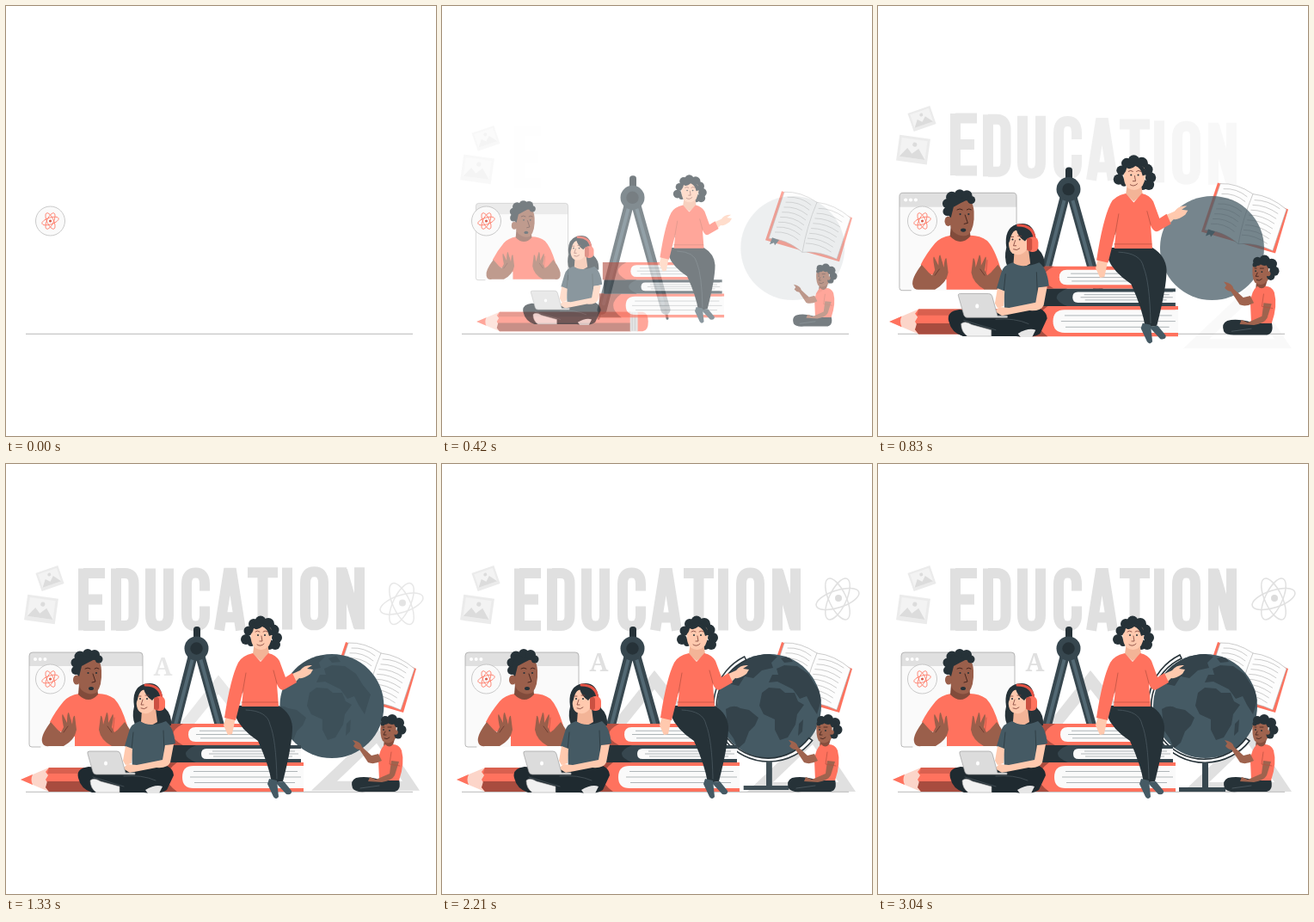
An HTML page for the animation above (3080 ms loop, 500x500 px).

```html
<!DOCTYPE html>
<html lang="en">
<head>
<meta charset="utf-8">
<title>Education</title>
<style>
html, body { margin: 0; height: 100%; overflow: hidden; background: #fff; }
svg { display: block; width: 100%; height: 100%; }
.line { fill: none; stroke-linecap: round; stroke-linejoin: round; }
</style>
</head>
<body>
<svg viewBox="0 0 500 500">
  <defs>
    <clipPath id="sphere"><circle cx="380.5" cy="281.5" r="60.5"/></clipPath>
    <g id="orbits">
      <ellipse rx="26" ry="10" transform="rotate(-18)"/>
      <ellipse rx="26" ry="10" transform="rotate(65)"/>
      <ellipse rx="26" ry="10" transform="rotate(115)"/>
    </g>
    <g id="photo">
      <rect x="-18" y="-15" width="36" height="30" fill="#ebebeb"/>
      <rect x="-15" y="-12" width="30" height="22" fill="#f3f3f3"/>
      <path d="M-15 10L-7 -1L-1 5L6 -2L15 10Z" fill="#dcdcdc"/>
      <circle cx="1" cy="-6" r="2.6" fill="#dcdcdc"/>
    </g>
    <path id="arm" d="M52 300Q40 316 42 323Q43 329 50 328H67Q80 321 82 309L80 293Q78 291 77 303L73 289Q71 288 71 301L66 291Q64 291 67 306L64 312L60 309Z"/>
  </defs>

  <g id="photos">
    <use href="#photo" transform="translate(51 133) rotate(-19) scale(.76 .74)"/>
    <use href="#photo" transform="translate(41 169) rotate(8)"/>
  </g>
  <g id="word" role="img" aria-label="EDUCATION" fill="none" stroke="#e0e0e0" stroke-width="12"></g>
  <g id="atom" fill="none" stroke="#e0e0e0" stroke-width="1.500">
    <use href="#orbits" x="460" y="157"/>
    <circle cx="461" cy="156" r="4" fill="#dcdcdc" stroke="none"/>
  </g>
  <g id="serif"><text x="182.500" y="240.500" text-anchor="middle" font-family="Noto Serif, Liberation Serif, serif" font-weight="700" font-size="29" fill="#e0e0e0">A</text></g>
  <path id="roof" d="M247 240L190 312H305ZM247 262L280 304H213Z" fill="#e0e0e0" fill-rule="evenodd"/>
  <path id="square" d="M432 308L355 381H481ZM431 326L461 370H385Z" fill="#e0e0e0" fill-rule="evenodd"/>

  <g id="openBook">
    <path d="M395 207L398 208L477 238L462 289L376 264Z" fill="#ff725e"/>
    <path d="M398 208Q417 207 436 220Q456 222 475 238L459 286Q438 276 419 278Q400 262 380 262Z" fill="#fdfdfd" stroke="#aaa" stroke-width=".6"/>
    <path d="M436 220Q424 248 419 278" class="line" stroke="#c4c4c4" stroke-width=".9"/>
    <g id="bookLines" class="line" stroke="#aaa" stroke-width=".6"></g>
    <path d="M384 261L392 264L387 270L386 267L381 269Z" fill="#455a64"/>
  </g>

  <g id="call">
    <path d="M27 329V223Q27 219 31 219H155Q159 219 159 223V329Z" fill="#fafafa"/>
    <path d="M27 235V223Q27 219 31 219H155Q159 219 159 223V235Z" fill="#e0e0e0"/>
    <path d="M40 329H30Q27 329 27 326V223Q27 219 31 219H155Q159 219 159 223V329" class="line" stroke="#a9a9a9" stroke-width=".8"/>
    <g fill="#fff"><circle cx="34" cy="227" r="2"/><circle cx="39.700" cy="227" r="2"/><circle cx="45.400" cy="227" r="2"/></g>
    <path d="M85 267Q73 269 67 276Q57 288 51 300L60 310L80 317V328H123L126 315L141 304Q134 281 126 273Q118 267 107 267Z" fill="#ff725e"/>
    <path d="M75 297L78 318M126 295L124 315" class="line" stroke="#b5503f" stroke-width=".7"/>
    <path d="M85 256L84 268Q96 280 107 268L106 258Z" fill="#814b3b"/>
    <path d="M84 236Q82 257 88 263Q97 270 105 266Q112 258 111 240Q110 223 96 223Q86 226 84 236Z" fill="#9a5f4b"/>
    <ellipse cx="82" cy="251" rx="4" ry="5.500" fill="#9a5f4b"/>
    <g fill="#263238">
      <circle cx="81" cy="240" r="5"/><circle cx="81" cy="231" r="5.500"/><circle cx="86" cy="224" r="6.500"/>
      <circle cx="95" cy="221" r="6"/><circle cx="103" cy="222" r="6"/><circle cx="108" cy="227" r="4.500"/>
      <path d="M79 241L85 247L88 235Q97 230 103 227L86 222Z"/>
      <circle cx="95.500" cy="243" r="1.100"/><circle cx="105" cy="243" r="1.100"/>
      <ellipse cx="99" cy="261" rx="3" ry="2"/>
    </g>
    <path d="M92 238Q95 236 98 238M103 238Q105 236 108 238M101 244L104 253L100 254" class="line" stroke="#3d211c" stroke-width=".9"/>
    <use href="#arm" fill="#9a5f4b"/>
    <use href="#arm" fill="#9a5f4b" transform="matrix(-1 0 0 1 190 0)"/>
    <path d="M67 312L72 305M123 312L118 305" class="line" stroke="#5b332b" stroke-width=".7"/>
  </g>

  <circle cx="51.500" cy="250" r="17" fill="#fafafa" stroke="#bdbdbd" stroke-width=".8"/>
  <g transform="translate(51.500 250) scale(.39)" fill="none" stroke="#ff725e" stroke-width="1.900">
    <use href="#orbits"/><circle r="4" fill="#d85f4f" stroke="none"/>
  </g>
  <path d="M23 381.300H473" stroke="#b0b0b0" stroke-width=".9"/>

  <g id="compass">
    <g class="line" stroke="#37474f" stroke-width="11"><path d="M217 224L186 345M226 224L260 345"/></g>
    <path d="M217 226L188 338M226 226L257 338" class="line" stroke="#526873" stroke-width="4"/>
    <path d="M184 345L182 355M260 345L262 355" class="line" stroke="#263238" stroke-width="3"/>
    <rect x="218" y="189" width="8" height="18" rx="3.500" fill="#263238"/>
    <circle cx="221.500" cy="214.500" r="14" fill="#37474f"/>
    <circle cx="221.500" cy="214.500" r="7.200" fill="#263238"/>
  </g>

  <g id="pencil">
    <path d="M17 367L50 353V381Z" fill="#fcd5c9"/>
    <path d="M17 367L31 361Q28 367 31 373Z" fill="#ff725e"/>
    <path d="M50 353H238V381H50L46 376L49 372L46 367L49 362L46 358Z" fill="#ff725e"/>
    <path d="M50 353H238V360H48Z" fill="#d9604f"/>
    <path d="M48 369H238V381H50L46 376Z" fill="#a84c3f"/>
    <path d="M247 353H255Q263 354 263 367T255 381H247Z" fill="#ff725e"/>
    <path d="M237 353H248V381H237Z" fill="#d5d5d5"/>
    <path d="M240 354V380M244 354V380" stroke="#999" stroke-width=".7"/>
  </g>

  <g id="globe">
    <circle cx="380.500" cy="281.500" r="60.500" fill="#455a64"/>
    <g clip-path="url(#sphere)"><g id="lands" fill="#34434b">
      <path d="M332 244Q345 222 378 220L390 224L383 231L385 237L372 240L362 249L352 247L345 258L336 256Z"/>
      <path d="M330 285Q339 279 347 284L357 286L368 295L364 304L357 311L352 324L344 331L339 319L332 309Z"/>
      <path d="M372 266L380 260L393 261L399 266L410 266L414 276L421 280L413 291L411 303L402 318L393 321L387 309L387 297L374 291L369 281Z"/>
      <path d="M380 254L384 245L391 245L389 238L398 234L413 235L426 244L434 257L443 268L436 291L429 280L424 270L416 273L408 262L398 257L390 253Z"/>
      <path d="M415 302L420 297L419 311L414 316ZM394 226L403 223L408 230L398 231Z"/>
    </g></g>
  </g>
  <g id="stand">
    <path d="M351 222A66 66 0 1 0 432 322L428 319A61.500 61.500 0 1 1 353 226Z" fill="#fff" stroke="#263238" stroke-width="1.600"/>
    <path d="M377 347H384V376H404V381H350V376H377Z" fill="#37474f"/>
  </g>

  <g id="reader">
    <g id="stack"></g>
    <g fill="#263238">
      <circle cx="279" cy="204" r="6"/><circle cx="282" cy="194" r="5.500"/><circle cx="288" cy="186" r="6"/>
      <circle cx="296" cy="183" r="6.500"/><circle cx="305" cy="186" r="7"/><circle cx="311" cy="193" r="6.500"/>
      <circle cx="315" cy="202" r="6"/><circle cx="313" cy="210" r="6"/><circle cx="306" cy="210" r="6"/>
      <circle cx="285" cy="208" r="4"/>
    </g>
    <path d="M289 206L287 221L296 229L306 221L304 207Z" fill="#f3b497"/>
    <path d="M285 191Q283 209 290 214Q299 219 306 211Q311 201 308 191Q295 183 285 191Z" fill="#ffc9ae"/>
    <path d="M283 199Q281 187 292 184Q306 183 311 198L306 200Q304 191 298 189Q292 194 288 191Q287 197 283 199Z" fill="#263238"/>
    <g fill="#263238"><circle cx="293" cy="199" r="1"/><circle cx="301" cy="199" r="1"/></g>
    <path d="M290 195Q292 193 295 195M299 195Q301 193 304 195M297 200L298 206L295 206M292 210Q296 213 300 209" class="line" stroke="#7b3f36" stroke-width=".8"/>
    <path d="M333 244L342 240Q347 233 356 234L350 238L357 239L354 244Q346 250 341 249L336 254Z" fill="#ffc9ae"/>
    <path d="M256 293L253 304L258 315L263 314L267 295Z" fill="#ffc9ae"/>
    <path d="M267 281L317 281Q332 290 333 306Q333 326 322 369L309 371Q306 351 293 322Q273 309 266 292Z" fill="#263238"/>
    <path d="M279 286Q304 287 307 303Q314 320 315 366" class="line" stroke="#4b5960" stroke-width=".8"/>
    <path d="M306 366L315 368L317 387Q314 391 311 387L304 372Z" fill="#455a64"/>
    <path d="M313 370L323 369L332 380Q333 385 326 384Z" fill="#455a64"/>
    <path d="M287 220Q274 223 270 231Q261 249 254 295L267 298L276 262L274 282H317L315 256Q319 265 324 262L338 254L333 243L325 248L318 229Q314 222 305 220L296 230Z" fill="#ff725e"/>
    <path d="M275 266L279 243M315 255L311 240M274 277H316" class="line" stroke="#b5503f" stroke-width=".7"/>
  </g>

  <g id="student">
    <path d="M149 282Q146 261 160 256Q179 251 182 271L185 284Q193 291 192 304L150 303Q146 294 149 282Z" fill="#263238"/>
    <path d="M158 286L157 300Q167 307 176 300L174 284Z" fill="#f3b497"/>
    <path d="M152 268Q150 286 157 289Q167 293 173 283L172 266Q160 258 152 268Z" fill="#ffc9ae"/>
    <path d="M150 281Q148 260 161 257Q172 255 174 270L170 275Q162 270 160 261Q154 266 153 274Z" fill="#263238"/>
    <path d="M162 257Q181 257 181 275" class="line" stroke="#e55345" stroke-width="3"/>
    <rect x="172" y="270" width="13" height="17" rx="6" fill="#ff725e"/><rect x="172" y="271" width="6" height="15" rx="3" fill="#cb5142"/>
    <g fill="#263238"><circle cx="156" cy="273" r="1"/><circle cx="164" cy="273" r="1"/></g>
    <path d="M154 270H157M162 269H166M159 274L157 280H160M157 284Q161 286 164 283" class="line" stroke="#7b3f36" stroke-width=".8"/>
    <path d="M156 299Q145 302 143 311L138 328L146 333L147 355H184L185 328L197 325Q195 306 186 299Q167 307 156 299Z" fill="#455a64"/>
    <path d="M183 310L184 335M148 312L146 332" class="line" stroke="#2b393f" stroke-width=".8"/>
    <path d="M139 328L136 345L139 350L146 348L147 331Z" fill="#ffc9ae"/>
    <path d="M84 365Q81 354 96 352L131 355Q158 356 177 349Q194 350 195 362L187 379Q178 385 160 382H100Q87 378 84 365Z" fill="#1f2a30"/>
    <path d="M137 363Q158 361 174 368M101 364L137 375" class="line" stroke="#48545a" stroke-width=".8"/>
    <path d="M185 327L195 326L191 347Q188 354 175 353L144 359L136 354L141 349L152 350L182 344Z" fill="#ffc9ae"/>
    <path d="M98 368Q102 364 110 369L132 375V382L105 382Q98 377 98 368Z" fill="#f1f1f1" stroke="#aaa" stroke-width=".6"/>
    <path d="M162 379Q174 372 182 375L178 383H165Z" fill="#e6e6e6"/>
    <path d="M97 334H129Q132 334 133 337L139 359H150V361H105Q102 361 101 358L95 337Q94 334 97 334Z" fill="#dcdcdc" stroke="#a0a0a0" stroke-width=".7"/>
    <ellipse cx="116" cy="348" rx="2" ry="2.500" fill="#fff"/>
  </g>

  <g id="boy">
    <path d="M435 367Q418 362 407 365Q400 368 403 377Q406 382 418 381H452Q460 379 457 367Z" fill="#263238"/>
    <path d="M412 377L434 374" class="line" stroke="#56646b" stroke-width=".7"/>
    <path d="M440 318L439 330L448 333L452 320Z" fill="#864e3d"/>
    <path d="M436 301Q434 315 438 322Q446 328 453 319L454 301Z" fill="#9f634e"/>
    <g fill="#263238">
      <circle cx="441" cy="298" r="5"/><circle cx="449" cy="297" r="6"/><circle cx="457" cy="301" r="6"/>
      <circle cx="460" cy="309" r="5.500"/><circle cx="456" cy="315" r="4.500"/><circle cx="438" cy="302" r="2.500"/>
      <circle cx="439" cy="309" r=".9"/><circle cx="446" cy="310" r=".9"/>
    </g>
    <circle cx="453" cy="312" r="2.800" fill="#9f634e"/>
    <path d="M438 306H440M444 306H448M441 311L439 315H442M440 319Q443 321 446 318" class="line" stroke="#3d211c" stroke-width=".8"/>
    <path d="M441 326Q434 331 433 345L434 368H457Q464 348 460 333Q457 326 450 326Q446 331 441 326Z" fill="#ff725e"/>
    <path d="M433 337L425 339L414 329Q413 323 403 321L406 325L404 328Q407 332 411 332L421 347Q428 350 437 345Z" fill="#9f634e"/>
    <path d="M448 345L446 360L430 367L423 364L421 369L437 370Q449 368 452 362L457 346Z" fill="#9f634e"/>
    <path d="M448 335L446 349L458 351" class="line" stroke="#b5503f" stroke-width=".7"/>
  </g>
</svg>
<script>
const LOOP = 3080, TOP = 121.5;
const $ = id => document.getElementById(id);

function add(parent, name, attrs) {
  const el = document.createElementNS('http://www.w3.org/2000/svg', name);
  for (const key in attrs) el.setAttribute(key, attrs[key]);
  return parent.appendChild(el);
}

// Condensed lettering: [left edge, strokes]
const letters = [
  [84, 'M6 0V72M6 5.500H31M6 36H28M6 66.500H31'],
  [122, 'M6 0V72M6 5.500H16Q26.500 5.500 26.500 17V55Q26.500 66.500 16 66.500H6'],
  [162, 'M6 0V54Q6 67 16.500 67T27 54V0'],
  [204, 'M27 26V18Q27 5 16.500 5T6 18V54Q6 67 16.500 67T27 54V44'],
  [242, 'M6 72L16.500 5.500H20.500L31 72M10 57H27'],
  [281, 'M0 5.500H35M17.500 0V72'],
  [321, 'M6 0V72'],
  [342, 'M6 18V54Q6 67 16.500 67T27 54V18Q27 5 16.500 5T6 18Z'],
  [384, 'M6 72V0M27 72V0M7 3L26 69']
].map(([x, d]) => add(add($('word'), 'g', {}), 'path', { d, transform: `translate(${x} ${TOP})` }).parentNode);

// Books: left, top, right, bottom, page start, cover, shade
function book(x, y, right, bottom, page, cover, shade) {
  const h = bottom - y, r = h / 2 - 4, g = $('stack');
  add(g, 'path', { fill: cover, d: `M${x} ${y}H${right}V${y + 4}H${right - 3}V${bottom - 4}H${right}V${bottom}H${x}Z` });
  add(g, 'path', { fill: shade, d: `M${x} ${y}H${page - 6}Q${page - 30} ${y + h / 2} ${page - 6} ${bottom}H${x}Z` });
  add(g, 'path', { fill: '#fafafa', d: `M${right} ${y + 4}H${page + r}Q${page} ${y + 4} ${page} ${y + h / 2}T${page + r} ${bottom - 4}H${right}Z` });
  for (let i = 1; i < 4; i++) {
    const ly = y + 4 + (h - 8) * i / 4;
    add(g, 'path', { stroke: '#90999d', 'stroke-width': .7, d: `M${page + 8 + i * 5 % 9} ${ly}H${right - i * 7 % 11}` });
  }
}
book(167, 347, 346, 381, 205, '#ff725e', '#a84c3f');
book(174, 327, 343, 347, 227, '#37474f', '#263238');
book(172, 302, 323, 327, 212, '#ff725e', '#b35043');

for (let i = 0; i < 8; i++) {
  const x = 402 - i * 2.1, y = 214 + i * 5.8;
  add($('bookLines'), 'path', { d: `M${x} ${y}q15 -1 27 9M${x + 36} ${y + 13}q15 0 29 10` });
}

// cubic-bezier(.36, -.01, .5, 1.38)
function ease(x) {
  if (x <= 0) return 0;
  if (x >= 1) return 1;
  const curve = (s, a, b) => 3 * (1 - s) ** 2 * s * a + 3 * (1 - s) * s * s * b + s ** 3;
  let lo = 0, hi = 1;
  for (let i = 0; i < 24; i++) {
    const mid = (lo + hi) / 2;
    if (curve(mid, .36, .5) < x) lo = mid; else hi = mid;
  }
  return curve(lo, -.01, 1.38);
}

const parts = [];
const slide = (el, start, dx, dy, dur = 957) => parts.push({ el, start, dur, move: k => `translate(${dx * (1 - k)} ${dy * (1 - k)})` });
const zoom = (el, cx, cy, start = 0, dur = 957) => parts.push({ el, start, dur,
  move: k => `translate(${cx} ${cy}) scale(${.5 + k / 2}) translate(${-cx} ${-cy})` });

zoom($('call'), 93, 274);
zoom($('pencil'), 140, 367);
zoom($('reader'), 251, 281);
zoom($('student'), 140, 319);
zoom($('boy'), 434, 336);
zoom($('stand'), 377, 301, 1580, 1000);
slide($('compass'), 0, 0, 22);
slide($('openBook'), 0, 0, 22);
slide($('photos'), 200, 0, 30, 760);
slide($('globe'), 227, 30, 0, 1220);
slide($('lands'), 1000, -30, 0);
slide($('square'), 600, 0, 22);
for (const id of ['atom', 'serif', 'roof']) slide($(id), 850, 0, 22);
letters.forEach((el, i) => slide(el, 385 + i * 31, 0, 18, 840));

const begin = performance.now();
function draw() {
  const t = (performance.now() - begin) % LOOP;
  for (const p of parts) {
    const k = ease((t - p.start) / p.dur);
    p.el.setAttribute('transform', p.move(k));
    p.el.setAttribute('opacity', Math.min(1, Math.max(0, k)));
  }
  requestAnimationFrame(draw);
}
draw();
</script>
</body>
</html>
```
